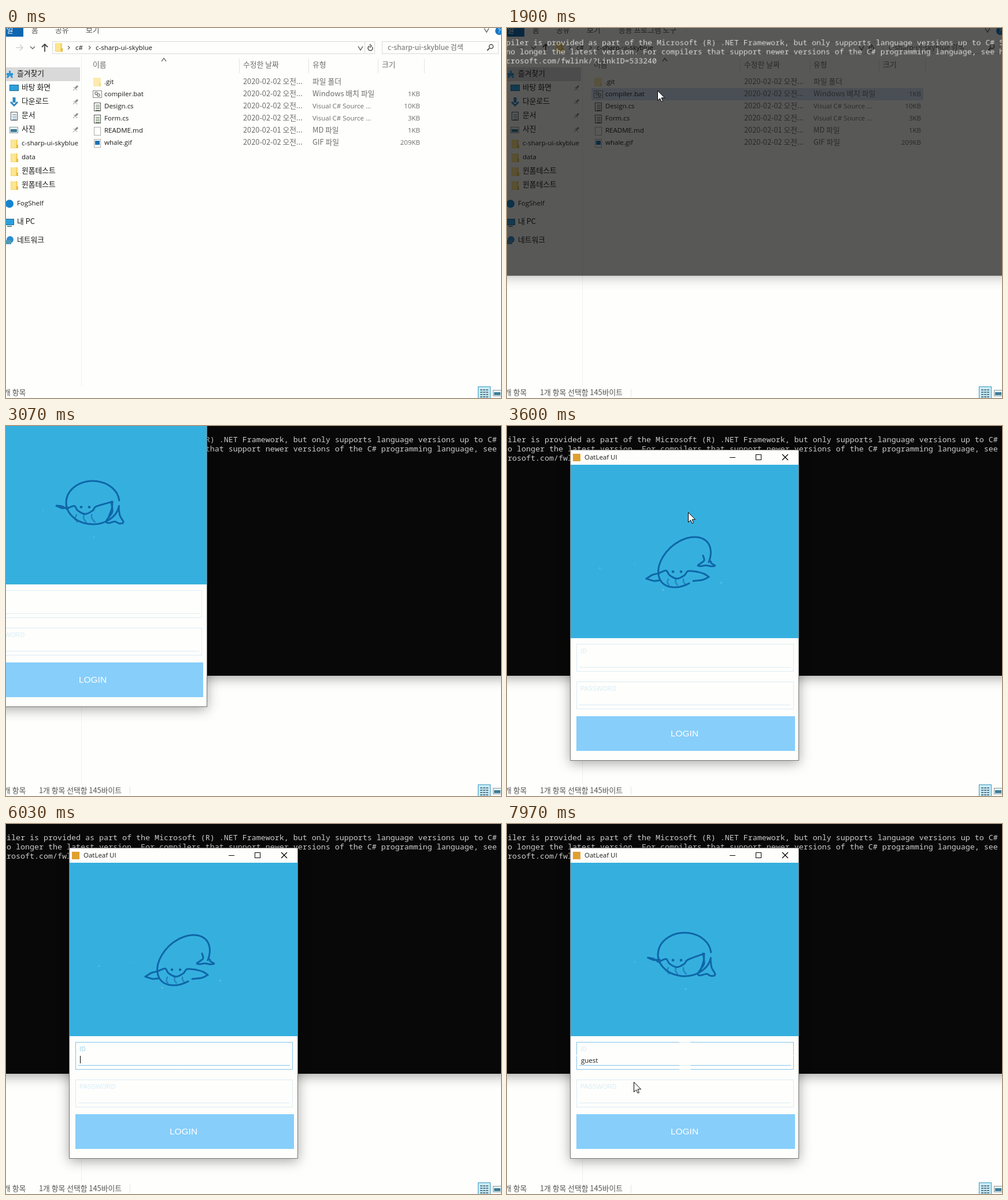
An HTML page with a canvas for the animation above (8 s loop, 856 by 640 pixels).

```html
<!DOCTYPE html>
<html lang="ko">
<head>
<meta charset="utf-8">
<style>
html, body { margin: 0; width: 100%; height: 100%; overflow: hidden; background: #fefefc }
canvas { display: block }
</style>
</head>
<body>
<canvas id="stage" width="856" height="640"></canvas>
<script>
const stage = document.getElementById('stage').getContext('2d');
const layer = document.createElement('canvas').getContext('2d');
const MARGIN = 150;
layer.canvas.width = 856 + 2 * MARGIN;
layer.canvas.height = 640 + 2 * MARGIN;
let g = stage;

const LOOP = 8000, PAPER = '#fefefc', INK = '#1a1a1a', DIM = '#6d6d6d', GRAY = '#555', RULE = '#e4e4e4';
const BLUE = '#35b0de', SKY = '#87cefa', NAVY = '#0f66a8';
const LATIN = '11.5px "Open Sans", "Noto Sans", sans-serif';
const HANGUL = '12.8px "Noto Sans CJK KR", "Noto Sans CJK", sans-serif';
const ARIAL = '"Liberation Sans", Arial, sans-serif';

const clamp = v => Math.max(0, Math.min(1, v));
const ramp = (t, from, length) => clamp((t - from) / length);
const smooth = p => p * p * (3 - 2 * p);
const mix = (a, b, p) => a + (b - a) * p;

function box(x, y, w, h, color) {
  g.fillStyle = color;
  g.fillRect(x, y, w, h);
}
function frame(x, y, w, h, color) {
  g.strokeStyle = color;
  g.lineWidth = 1;
  g.strokeRect(x + .5, y + .5, w, h);
}
function line(color, width, ...p) {
  g.strokeStyle = color;
  g.lineWidth = width;
  g.beginPath();
  for (let i = 0; i < p.length; i += 2) g.lineTo(p[i], p[i + 1]);
  g.stroke();
}
function ring(x, y, r, color, from = 0, to = 7) {
  g.strokeStyle = color;
  g.lineWidth = 1.5;
  g.beginPath();
  g.arc(x, y, r, from, to);
  g.stroke();
}
function dot(x, y, r, color) {
  g.fillStyle = color;
  g.beginPath();
  g.arc(x, y, r, 0, 7);
  g.fill();
}
function text(s, x, y, color = INK, font, align = 'left') {
  g.font = font || (/[가-힣]/.test(s) ? HANGUL : LATIN);
  g.fillStyle = color;
  g.textAlign = align;
  g.fillText(s, x, y + 4.3);
}

// --- File manager ---
function folder(x, y) {
  box(x, y - 7, 12, 15, '#f8d468');
  box(x + 1, y - 7, 8, 14, '#fde690');
  box(x + 10, y + 2, 3, 6, '#e8bc3c');
}
function picture(x, y) {
  box(x, y - 5, 15, 11, '#8a9a9a');
  box(x + 1, y - 4, 13, 9, '#e8f4fa');
  box(x + 2, y - 1, 11, 5, '#3c7c98');
}
function screen(x, y) {
  box(x, y - 6, 16, 11, '#1a6c98');
  box(x + 1, y - 5, 14, 9, '#2ca0dc');
}
function page(x, y, mark) {
  box(x, y - 7, 12, 15, '#fff');
  frame(x, y - 7, 11, 14, mark ? '#555' : '#aaa');
  if (mark) for (let i = 0; i < 4; i++) box(x + 3, y - 3 + i * 3, 7, 1, mark);
}
function pin(x, y) {
  line('#888', 3, x, y, x + 4, y - 4);
  line('#888', 1, x - 4, y + 4, x, y);
  line('#888', 1, x - 3, y - 2, x + 3, y + 4);
}
const chevron = (x, y, d = 3) => line('#666', 1.4, x - 4, y - d / 1.5, x, y + d / 1.5, x + 4, y - d / 1.5);
const crumb = x => line('#666', 1.3, x - 2, 31, x + 1, 34, x - 2, 37);

const files = [
  ['.git', '02', '파일 폴더', ''],
  ['compiler.bat', '02', 'Windows 배치 파일', '1KB'],
  ['Design.cs', '02', 'Visual C# Source ...', '10KB'],
  ['Form.cs', '02', 'Visual C# Source ...', '3KB'],
  ['README.md', '01', 'MD 파일', '1KB'],
  ['whale.gif', '02', 'GIF 파일', '209KB']
];
const places = ['바탕 화면', '다운로드', '문서', '사진', 'c-sharp-ui-skyblue', 'data', '윈폼테스트', '윈폼테스트'];

function drawTop(selected) {
  box(0, 0, 30, 15, '#0c66b0');
  text('파일', -11, 4, '#fff');
  ['홈', '공유', '보기'].forEach((s, i) => text(s, [44, 85, 138][i], 4, GRAY));
  if (selected) {
    text('응용 프로그램 도구', 193, 4, GRAY);
    box(310, 0, 1, 10, RULE);
  }
  chevron(831, 4, 5);
  dot(853, 5, 7, '#1476c4');
  text('?', 853, 5, '#fff', LATIN, 'center');

  line('#d0d0d0', 1.5, 17, 34, 29, 34);
  line('#d0d0d0', 1.5, 24, 29, 29, 34, 24, 39);
  chevron(46, 34);
  line('#444', 1.8, 67, 41, 67, 28);
  line('#444', 1.8, 62, 33, 67, 28, 72, 33);
  frame(80, 23, 557, 21, '#d9d9d9');
  box(620, 24, 1, 20, '#d9d9d9');
  folder(85, 33);
  crumb(109);
  text('c#', 120, 34);
  crumb(145);
  text('c-sharp-ui-skyblue', 155, 34);
  chevron(613, 35, 5);
  ring(630, 35, 4, GRAY, -.6, 4.4);
  line(GRAY, 1.5, 629, 28, 632, 31, 629, 34);
  frame(650, 23, 201, 21, '#d9d9d9');
  text('c-sharp-ui-skyblue 검색', 660, 34, DIM, HANGUL.replace('12.8', '12.2'));
  ring(839, 32, 3.5, GRAY);
  line(GRAY, 2, 836, 35, 832, 39);
}

function drawSide() {
  box(0, 68, 128, 24, '#d9d9d9');
  box(130, 50, 1, 570, '#f0f0ec');
  line('#2c94d8', 4, 1, 80, 12, 80);
  line('#2c94d8', 3, 6.5, 74, 6.5, 80, 2, 86);
  line('#2c94d8', 3, 7, 80, 11, 86);
  text('즐겨찾기', 19, 79);
  places.forEach((name, i) => {
    const y = 103 + i * 24;
    text(name, 27, y);
    if (i > 3) folder(8, y + 1);
    else pin(120, y + 1);
  });
  screen(6, 104);
  line('#2c88c0', 5, 14, 120, 14, 129);
  line('#2c88c0', 3, 8, 128, 14, 134, 20, 128);
  page(8, 152, '#5584a4');
  picture(6, 176);
  dot(6, 304, 7, '#1484d0');
  text('FogShelf', 19, 303);
  screen(-2, 336);
  box(2, 342, 8, 2, '#6c8c90');
  text('내 PC', 19, 335);
  dot(7, 366, 6, '#2c8cd0');
  box(0, 367, 9, 7, '#5098b8');
  text('네트워크', 19, 367);
}

function drawFiles(selected, [px, py]) {
  const hover = px > 146 && px < 720 ? Math.floor((py - 83) / 21) : -1;
  ['이름', '수정한 날짜', '유형', '크기'].forEach((s, i) => {
    text(s, i ? 290 + 120 * i : 150, 64, DIM);
    box(i < 3 ? 403 + 120 * i : 723, 53, 1, 25, RULE);
  });
  chevron(273, 55, -4);
  files.forEach(([name, day, kind, size], i) => {
    const y = 93 + i * 21;
    if (selected && i === 1) box(146, y + 11 - 21, 574, 21, '#d4e4f4');
    else if (!selected && i === hover) box(146, y - 10, 574, 21, '#e5f3ff');
    text(name, 170, y);
    text(`2020-02-${day} 오전...`, 410, y, DIM);
    text(kind, 530, y, DIM);
    text(size, 716, y, DIM, LATIN, 'right');
    if (i > 1) page(152, y + 1, i < 4 && '#445c38');
  });
  box(151, 86, 13, 15, '#fceab0');
  box(161, 95, 3, 6, '#f4dc88');
  frame(150, 108, 15, 12, '#888');
  ring(156, 113, 2.2, '#888');
  ring(160, 116, 2.2, '#888');
  box(154, 195, 8, 7, '#1c74b8');
}

function drawExplorer(t, cursor) {
  const selected = t >= 1620;
  box(0, 0, 856, 640, PAPER);
  drawTop(selected);
  drawSide();
  drawFiles(selected, cursor || [0, 0]);
  text('개 항목', -4, 631, GRAY);
  if (selected) {
    text('1개 항목 선택함 145바이트', 57, 631, GRAY);
    box(214, 624, 1, 14, RULE);
  }
  box(816, 620, 22, 20, '#c8ecf8');
  frame(816, 620, 21, 20, '#3c98c0');
  for (let y = 625; y < 640; y += 4)
    for (let x = 820; x < 834; x += 5) box(x, y, 4, 2, '#5c7c88');
  picture(842, 631);
}

// --- Windows that fade and grow in, blended as one picture ---
function opening(p, cx, cy, draw) {
  if (p <= 0) return;
  if (p === 1) return draw();
  const s = 1 - .12 * (1 - p) ** 2;
  g = layer;
  g.setTransform(1, 0, 0, 1, 0, 0);
  g.clearRect(0, 0, g.canvas.width, g.canvas.height);
  g.translate(MARGIN, MARGIN);
  draw();
  g = stage;
  g.save();
  g.globalAlpha = p;
  g.translate(cx, cy);
  g.scale(s, s);
  g.drawImage(layer.canvas, -cx - MARGIN, -cy - MARGIN);
  g.restore();
}
function shadowed(x, y, w, h, color) {
  g.save();
  g.shadowColor = 'rgba(0,0,0,.35)';
  g.shadowBlur = 20;
  g.shadowOffsetY = 4;
  box(x, y, w, h, color);
  g.restore();
}
const output = [
  'piler is provided as part of the Microsoft (R) .NET Framework, but only supports language versions up to C# 5',
  'no longer the latest version. For compilers that support newer versions of the C# programming language, see http',
  'crosoft.com/fwlink/?LinkID=533240'
];
function drawConsole() {
  shadowed(-85, -112, 985, 544, '#080808');
  output.forEach((s, i) => text(s, -7, 24 + 16 * i, '#ccc', '13.333px "Noto Sans Mono", monospace'));
}

// --- Whale ---
// Catmull-Rom curve through flat x, y pairs
function curve(p, color = NAVY, width = 3) {
  const n = p.length / 2, at = i => {
    const k = 2 * Math.max(0, Math.min(n - 1, i));
    return [p[k], p[k + 1]];
  };
  g.strokeStyle = color;
  g.lineWidth = width;
  g.beginPath();
  g.moveTo(p[0], p[1]);
  for (let i = 0; i < n - 1; i++) {
    const [a, b, c, d] = [at(i - 1), at(i), at(i + 1), at(i + 2)];
    g.bezierCurveTo(b[0] + (c[0] - a[0]) / 6, b[1] + (c[1] - a[1]) / 6,
      c[0] - (d[0] - b[0]) / 6, c[1] - (d[1] - b[1]) / 6, c[0], c[1]);
  }
  g.stroke();
}
const noise = n => Math.abs(Math.sin(n * 127.1) * 43758.5) % 1;

function drawBubbles(turn) {
  for (let i = 1; i < 13; i++) {
    const age = (turn + noise(i)) % 1;
    if (age < .3) dot(155 + 230 * noise(i + 20), 170 + 145 * noise(i + 40), 2 * Math.sin(age / .3 * Math.PI), '#62bee0');
  }
}
// It rolls once per cycle: the face follows a cosine and the tail swings a third of a turn behind
function drawWhale(t) {
  const turn = (t - 3600 + 2 * 2430) / 2430 % 1, angle = 2 * Math.PI * turn;
  const lean = Math.max(0, Math.cos(angle)) ** 4;
  const eye = 228.5 + 23.5 * Math.cos(angle);
  const top = 188 + 4 * lean, bottom = 263 + 16 * lean;
  const cy = (top + bottom) / 2, ry = (bottom - top) / 2;
  drawBubbles(turn);
  g.lineCap = g.lineJoin = 'round';

  for (let i = 0; i < 3; i++) {
    const x = 279 + 13 * i, y = eye + 13, h = bottom - y - 4, k = h / 40;
    curve([x, y, x - (7 - 4.5 * i) * k, y + h / 2, x + (3 + 7.5 * i) * k, y + h], '#2584c0', 2.5);
  }

  g.strokeStyle = NAVY;
  g.lineWidth = 3;
  g.save();
  g.translate(307, cy);
  g.transform(1, 0, -.4 * lean, 1, 0, 0);
  g.beginPath();
  g.ellipse(0, 0, 46 - 4 * lean, ry, 0, .15 + .85 * lean, 2 * Math.PI - .1 + .1 * lean);
  g.restore();
  g.stroke();

  // Face line, then a fin on each side
  const rx = 341 - 13 * lean, rightY = 224 + 28 * lean, leftY = eye + 3;
  curve([262, leftY, 275, eye - 2, 281, eye + 6, 294, eye + 12, 307, eye + 6, 313, eye - 1, rx, rightY]);
  const tx = 245 - 4 * Math.cos(angle), ty = 231 + 33 * lean;
  curve([262, leftY, (262 + tx) / 2, (leftY + ty) / 2 - 2, tx, ty]);
  curve([tx, ty, 254, ty + 4, 264, ty + 3]);
  const fx = 335 + 14 * lean, fy = eye + 16 - 7 * lean;
  curve([rx, rightY, (rx + fx) / 2 + 2, (rightY + fy) / 2 - 1, fx, fy]);
  curve([fx, fy, fx - 10 * lean, fy + 5 * lean, fx - 27 * lean, fy + 7 * lean]);

  const h = 222.4 - 36.8 * Math.cos(angle - 2 * Math.PI / 3), u = (h - 226) / 36;
  curve([352, 234, 354, mix(234, h, .6), 360, h + 2 * u, 353, h + 5 * u, 345, h + u,
    335, h + 4 * u, 330, h + u, 335, h - 8 * u, 341, mix(224, h, .5), 339, 224]);
  dot(287, eye, 2.3, NAVY);
  dot(301, eye, 2.3, NAVY);
  g.lineCap = 'butt';
  g.lineJoin = 'miter';
}

// --- Login form ---
function field(y, label, focus) {
  const pale = '#dcecf4', lit = '#84c4ec', x = 120, w = 375, h = 47;
  frame(x, y, w, h, pale);
  box(125, y + 40, 366, 1, pale);
  text(label, 127, y + 12, focus > .97 ? '#9cd4f0' : '#d8ecf6', '10.8px ' + ARIAL);
  if (!focus) return;
  // Lit edges reach from the corners toward the middle of each side
  const dx = w / 2 * focus, dy = h / 2 * focus, under = 183 * focus;
  for (const ey of [y, y + h]) {
    box(x, ey, dx, 1, lit);
    box(x + w - dx, ey, dx, 1, lit);
  }
  for (const ex of [x, x + w]) {
    box(ex, y, 1, dy, lit);
    box(ex, y + h - dy, 1, dy, lit);
  }
  box(125, y + 40, under, 1, lit);
  box(491 - under, y + 40, under, 1, lit);
}
function drawForm(t) {
  shadowed(109, 41, 396, 538, '#777');
  box(110, 42, 394, 536, PAPER);
  box(114, 48, 13, 13, '#e0a030');
  text('OatLeaf UI', 134, 54);
  box(385, 54, 10, 1, '#000');
  frame(430, 49, 9, 9, '#000');
  line('#000', 1.2, 476, 49, 486, 59);
  line('#000', 1.2, 486, 49, 476, 59);
  box(110, 67, 394, 300, BLUE);
  drawWhale(t);

  field(377, 'ID', ramp(t, 4350, 230) * (1 - ramp(t, 7940, 600)));
  field(442, 'PASSWORD', 0);
  const typed = 'guest'.slice(0, Math.max(0, Math.floor((t - 6390) / 110)));
  text(typed, 128, 409);
  const blink = Math.floor((t - 4500) / 530) % 2 === 0;
  if (t > 4450 && t < 7940 && (blink || t > 6390 && t < 7000))
    box(128 + (typed && g.measureText(typed).width + 1), 401, 1, 13, '#000');
  box(120, 502, 378, 60, SKY);
  text('LOGIN', 307, 533, '#fff', '15.5px ' + ARIAL, 'center');
}

// --- Pointer: each move has a start, an end and a goal ---
const DRAG = 3030, DROP = 3480;
const moves = [
  [70, 670, 260, 108], [2450, 2850, 139, -41], [DRAG, DROP, 300, 54],
  [DROP, 3600, 313, 149], [4100, 4500, 228, 387], [7550, 7850, 219, 446]
];
function pointer(t) {
  if (t < 70 || t > 5250 && t < 7550) return null;
  return moves.reduce(([x, y], [from, to, goalX, goalY]) => {
    const p = smooth(ramp(t, from, to - from));
    return [mix(x, goalX, p), mix(y, goalY, p)];
  }, [745, 255]);
}
const arrow = new Path2D('M0 0V17L4 13.3L6.6 19L9 18L6.5 12.3H12Z');
function drawPointer([x, y]) {
  g.save();
  g.translate(x + .5, y + .5);
  g.fillStyle = '#fff';
  g.strokeStyle = '#000';
  g.lineWidth = 1;
  g.fill(arrow);
  g.stroke(arrow);
  g.restore();
}

function draw(now) {
  const t = now % LOOP, cursor = pointer(t);
  drawExplorer(t, cursor);
  opening(ramp(t, 1766, 200), 405, 160, drawConsole);
  const rest = 1 - smooth(ramp(t, DRAG, DROP - DRAG));
  g.save();
  g.translate(Math.round(-161 * rest), Math.round(-95 * rest));
  opening(ramp(t, 2262, 200), 307, 310, () => drawForm(t));
  g.restore();
  if (cursor) drawPointer(cursor);
}
const start = performance.now();
(function tick() {
  draw(performance.now() - start);
  requestAnimationFrame(tick);
})();
</script>
</body>
</html>
```
